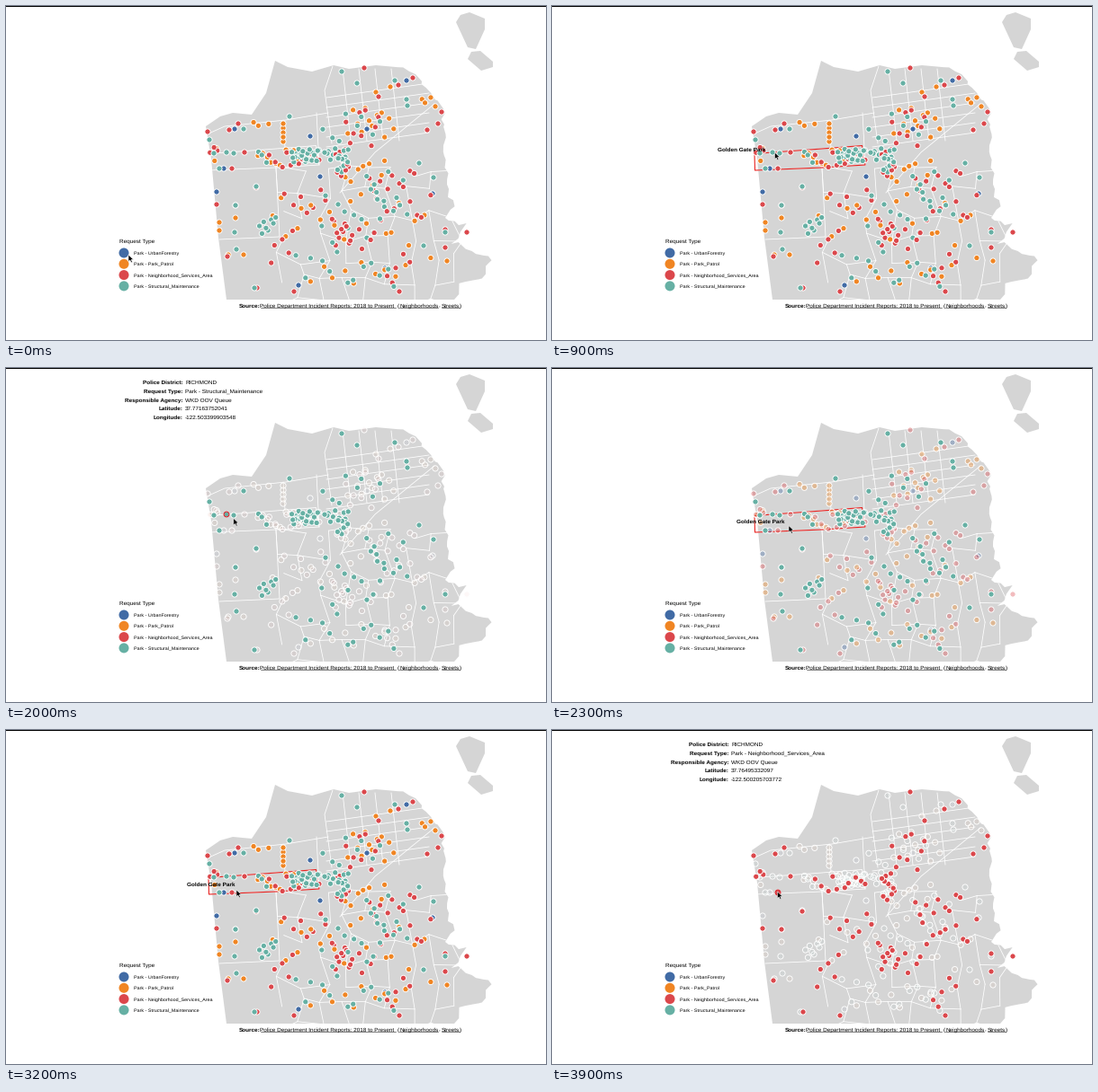
A matplotlib script for the animation above (4000 ms loop, 600 px wide and 372 px high).

```python
import numpy as np
import matplotlib.pyplot as plt
from matplotlib.animation import FuncAnimation
from matplotlib.colors import to_rgba
from matplotlib.patches import Circle, Polygon

W, H, DPI = 600, 372, 100
STEP, FRAMES = 100, 40
PT = 72 / DPI
LAND = "#d5d5d5"
TYPES = {"UrbanForestry": "#416ba5", "Park_Patrol": "#f08523",
         "Neighborhood_Services_Area": "#db474b",
         "Structural_Maintenance": "#66b0a4"}
RED, TEAL = 2, 3

plt.rcParams["font.family"] = ["Liberation Sans", "DejaVu Sans"]
plt.rcParams["text.hinting"] = "none"
rng = np.random.default_rng(12)

fig = plt.figure(figsize=(W / DPI, H / DPI), dpi=DPI, facecolor="white")
ax = fig.add_axes([0, 0, 1, 1])
ax.set_xlim(0, W)
ax.set_ylim(H, 0)
ax.axis("off")


def line(pts, color="white", width=0.8, z=2):
    xs, ys = zip(*pts)
    return ax.plot(xs, ys, color=color, lw=width * PT, zorder=z)[0]


def text(x, y, s, px=6.4, bold=False, ha="left"):
    return ax.text(x, y, s, fontsize=px * PT, ha=ha, va="baseline", zorder=8,
                   color="black", weight="bold" if bold else "normal")


def land(pts):
    return ax.add_patch(Polygon(pts, fc=LAND, ec="none", zorder=1))


def piers(pts, step=6, depth=2.5):
    """Break a smooth shore into a toothed one."""
    out = []
    for p, q in zip(pts, pts[1:]):
        p, q = np.array(p, float), np.array(q, float)
        n = max(1, int(np.hypot(*(q - p)) / step))
        for k in range(n):
            out.append(p + (q - p) * k / n + rng.uniform(-depth, depth, 2))
    return out + [pts[-1]]


# Land
north = [(222, 134), (238, 123), (252, 119), (273, 121), (289, 97), (299, 61),
         (313, 68), (340, 73), (364, 66), (381, 70), (411, 66)]
east = [(437, 66), (460, 82), (485, 112), (489, 172), (490, 205), (497, 222),
        (486, 236), (510, 244), (496, 263), (541, 281), (529, 302),
        (506, 311), (498, 327)]
west = [(245, 327), (236, 258), (228, 170)]
city = land(north + piers(east) + west)
land([(500, 18), (505, 10), (515, 7), (532, 14), (532, 26), (522, 48),
      (513, 46)])
land([(517, 51), (527, 50), (541, 62), (541, 68), (528, 72), (513, 59)])

# District borders
borders = [[(223, 143), (243, 134), (311, 127), (358, 119)],
           [(308, 127), (310, 158)], [(345, 119), (348, 177)],
           [(363, 67), (354, 94), (362, 153)],
           [(476, 109), (410, 163), (371, 208)],
           [(300, 180), (304, 257), (237, 260)]]
borders += [[(356, y), (470, y - 16)] for y in range(102, 160, 11)]
borders += [[(x, 70), (x + 9, 150)] for x in range(374, 440, 18)]

cols, rows = 9, 7
gx, gy = np.meshgrid(np.linspace(306, 500, cols), np.linspace(183, 330, rows))
gx += rng.uniform(-7, 7, gx.shape)
gy += rng.uniform(-7, 7, gy.shape)
for r in range(rows):
    for c in range(cols):
        for r2, c2 in ((r + 1, c), (r, c + 1)):
            if r2 < rows and c2 < cols and rng.random() < 0.8:
                borders.append([(gx[r, c], gy[r, c]), (gx[r2, c2], gy[r2, c2])])
for b in borders:
    line(b).set_clip_path(city)

edge = [(225, 164.5), (300, 159), (344.5, 155.5), (348, 177), (300, 180),
        (225.5, 183)]
edge.append(edge[0])
line(edge)
park = line(edge, "#e8211f", 1.1, 3)


# Dots: single places first, then busy areas as (x, y, width, height, count)
def spread(x, y, w, h, n):
    xs = x + w * (rng.permutation(n) + rng.uniform(0.2, 0.8, n)) / n
    ys = y + h * (rng.permutation(n) + rng.uniform(0.2, 0.8, n)) / n
    return list(zip(xs, ys))


singles = [
    [(445, 83), (338, 145), (254, 137), (401, 137), (242, 181), (349, 190),
     (234, 207), (474, 209), (325, 311), (421, 292)],
    [(427, 90), (411, 96), (237, 241), (237, 250), (247, 277), (264, 277),
     (255, 236), (490, 284)] + [(308, y) for y in range(131, 155, 5)],
    [(398, 69), (452, 80), (436, 88), (414, 101), (484, 118), (480, 131),
     (468, 138), (258, 131), (248, 138), (224, 140), (265, 163), (251, 181),
     (234, 221), (255, 222), (278, 202), (246, 279), (512, 252), (488, 249),
     (488, 269), (279, 314), (320, 318), (437, 318)],
    [(373, 73), (390, 86), (432, 83), (445, 104), (446, 111), (315, 123),
     (264, 137), (226, 149), (231, 164), (245, 163), (253, 164), (237, 181),
     (278, 201), (255, 222), (254, 252), (256, 271), (475, 191), (459, 175),
     (488, 252), (464, 267), (276, 314)]]
areas = [
    [],
    [(460, 99, 18, 15, 4), (268, 128, 28, 6, 3), (378, 112, 55, 35, 12),
     (227, 155, 8, 20, 3), (278, 159, 65, 19, 13), (367, 170, 58, 30, 9),
     (290, 205, 135, 57, 15), (425, 210, 50, 78, 6), (336, 284, 112, 26, 10)],
    [(376, 112, 40, 47, 9), (226, 156, 10, 9, 3), (290, 162, 62, 18, 10),
     (366, 158, 15, 32, 11), (400, 182, 58, 26, 9), (306, 202, 54, 30, 7),
     (410, 210, 66, 28, 8), (361, 236, 25, 32, 12), (290, 248, 32, 40, 5),
     (388, 235, 62, 78, 10)],
    [(350, 117, 68, 37, 8), (317, 159, 31, 15, 25), (353, 158, 28, 14, 12),
     (367, 168, 14, 18, 8), (278, 157, 14, 22, 3), (398, 182, 50, 58, 12),
     (280, 234, 21, 20, 8), (346, 208, 78, 57, 12), (318, 272, 120, 42, 13)]]

groups = [s + sum((spread(*a) for a in near), [])
          for s, near in zip(singles, areas)]
xy = np.array(sum(groups, []), float)
kind = np.repeat(range(4), [len(g) for g in groups])
rgba = np.array([to_rgba(c) for c in TYPES.values()])[kind]
mixed = np.argsort(kind + rng.uniform(0, 2, len(kind)))

dots = ax.scatter(xy[:, 0], xy[:, 1], s=(6.2 * PT) ** 2, c=rgba,
                  edgecolors="white", linewidths=0.9 * PT, zorder=4)
ring = Circle((0, 0), 2.9, fc="none", ec="#d8222a", lw=1.1 * PT, zorder=5)
ax.add_patch(ring)

# Legend and source line
text(126, 264, "Request Type")
for i, (name, color) in enumerate(TYPES.items()):
    y = 275 + 12.3 * i
    ax.add_patch(Circle((131, y), 5.5, fc=color, ec="none", zorder=8))
    text(142, y + 2.2, "Park - " + name, 5.34)

BASE = 335.5
text(259, BASE, "Source:", bold=True)
for x, s in [(434.8, "("), (480.3, ","), (504.2, ")")]:
    text(x, BASE, s)
for x, end, s in [
        (282.5, 432.5, "Police Department Incident Reports: 2018 to Present"),
        (437, 480, "Neighborhoods"), (484, 504, "Streets")]:
    text(x, BASE, s)
    line([(x, BASE + 0.9), (end, BASE + 0.9)], "black", 0.5, 8)
ax.fill_between([0, W], 0, 0.9, color="black", lw=0, zorder=9)

# Tooltip
fields = ["Police District:", "Request Type:", "Responsible Agency:",
          "Latitude:", "Longitude:"]
tops = [18.3 + 9.65 * i for i in range(len(fields))]
keys = [text(196.5, y, s, bold=True, ha="right") for y, s in zip(tops, fields)]
vals = [text(199, y, "") for y in tops]
AGENCY = "WKD OOV Queue"
tips = {
    TEAL: ["RICHMOND", "Park - Structural_Maintenance", AGENCY,
           "37.77163752041", "-122.503399903548"],
    RED: ["RICHMOND", "Park - Neighborhood_Services_Area", AGENCY,
          "37.76495332097", "-122.500205703772"]}
hovered = {TEAL: (245, 163), RED: (251, 181)}

label = text(0, 0, "Golden Gate Park", bold=True)
arrow = np.array([(0, 0), (0, 7.6), (1.8, 6), (3.1, 8.8), (4.4, 8.2),
                  (3.1, 5.5), (5.5, 5.3)])
cursor = Polygon(arrow, fc="black", ec="white", lw=0.5 * PT, zorder=10)
ax.add_patch(cursor)

POINTER = list(zip(
    (0, 136, 277), (600, 238, 178), (900, 247.5, 163), (1200, 246, 162),
    (1800, 246, 162), (2300, 263, 175.5), (3200, 256, 178), (3500, 250.5, 180)))


def fade_at(t):
    if t < 2100:
        return np.clip((t - 960) / 240, 0, 1)
    if t < 3600:
        return np.clip((2700 - t) / 600, 0, 1)
    return np.sin((t - 3600) / 300 * np.pi / 2)


def draw(i):
    t = i * STEP
    top = RED if t >= 3600 else TEAL
    hover = 1000 <= t < 2100 or t >= 3600
    inside = 600 <= t < 1000 or 2100 <= t < 3500

    order = mixed
    if t >= 1000:
        order = mixed[np.argsort(kind[mixed] == top, kind="stable")]
    colors = rgba.copy()
    colors[kind != top, 3] = 1 - 0.96 * fade_at(t)
    dots.set_offsets(xy[order])
    dots.set_facecolors(colors[order])

    ring.set_visible(hover)
    ring.center = hovered[top]
    for key, val, s in zip(keys, vals, tips[top]):
        key.set_visible(hover)
        val.set_visible(hover)
        val.set_text(s)

    x, y = (np.interp(t, POINTER[0], p) for p in POINTER[1:])
    cursor.set_xy(arrow + (x, y))
    late = (t - 900) / 2300
    park.set_visible(inside)
    label.set_visible(inside)
    label.set_position((x - 63 + 8 * late, y - 1 - 3 * late))
    return []


anim = FuncAnimation(fig, draw, frames=FRAMES, interval=STEP, repeat=True,
                     repeat_delay=0, blit=False)
plt.show()
```
